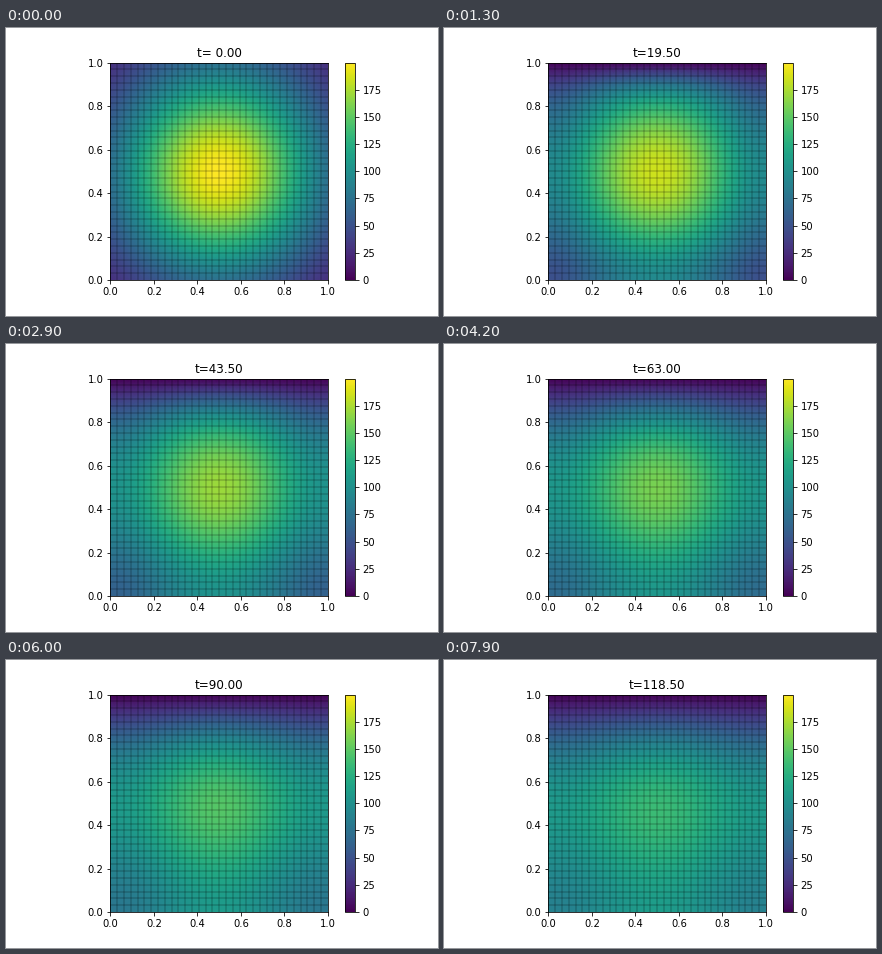
Animation, 432 px wide and 288 px high, one loop 8 s. Source, as a matplotlib script:

```python
import numpy as np
import matplotlib.pyplot as plt
from matplotlib.animation import FuncAnimation

N = 32              # grid cells per side
FRAMES = 80
DT = 0.15           # time step
SUBSTEPS = 10       # steps per frame
DIFF = 2.5e-4       # diffusivity
PEAK = 200.0
V_MAX = 199.9

plt.rcParams["font.family"] = "DejaVu Sans"

nodes = np.linspace(0, 1, N + 1)
bump = np.exp(-4 * (nodes - 0.5) ** 2)


def step_matrix(cold_end):
    """One implicit 1D heat step, insulated or held at zero at the far end."""
    n = N + 1
    lap = np.diag(np.full(n, -2.0))
    lap += np.diag(np.ones(N), 1) + np.diag(np.ones(N), -1)
    lap[0, 1] = lap[-1, -2] = 2
    keep = np.eye(n)
    if cold_end:
        lap[-1] = 0
        keep[-1, -1] = 0
    return np.linalg.inv(np.eye(n) - DT * DIFF * N ** 2 * lap) @ keep


step_x = step_matrix(False)
step_y = step_matrix(True)


def profile(step, i):
    return np.linalg.matrix_power(step, i * SUBSTEPS) @ bump


def temperature(i):
    return PEAK * np.outer(profile(step_y, i), profile(step_x, i))


fig, ax = plt.subplots(figsize=(6, 4), dpi=72)
fig.subplots_adjust(left=0.125, right=0.9, bottom=0.125, top=0.88)

mesh = ax.pcolormesh(nodes, nodes, temperature(0), cmap="viridis",
                     vmin=0, vmax=V_MAX, shading="gouraud")
grid = dict(colors="black", linewidth=0.3, antialiased=True)
ax.vlines(nodes[1:-1], 0, 1, **grid)
ax.hlines(nodes[1:-1], 0, 1, **grid)
ax.set_aspect("equal")
ax.set(xlim=(0, 1), ylim=(0, 1),
       xticks=np.linspace(0, 1, 6), yticks=np.linspace(0, 1, 6))
fig.colorbar(mesh, ax=ax, ticks=np.arange(0, 200, 25))
title = ax.set_title("t= 0.00")


def update(i):
    mesh.set_array(temperature(i))
    title.set_text(f"t={i * SUBSTEPS * DT:5.2f}")
    return mesh, title


anim = FuncAnimation(fig, update, frames=FRAMES, interval=100,
                     repeat=True, repeat_delay=0, blit=False)
plt.show()
```
